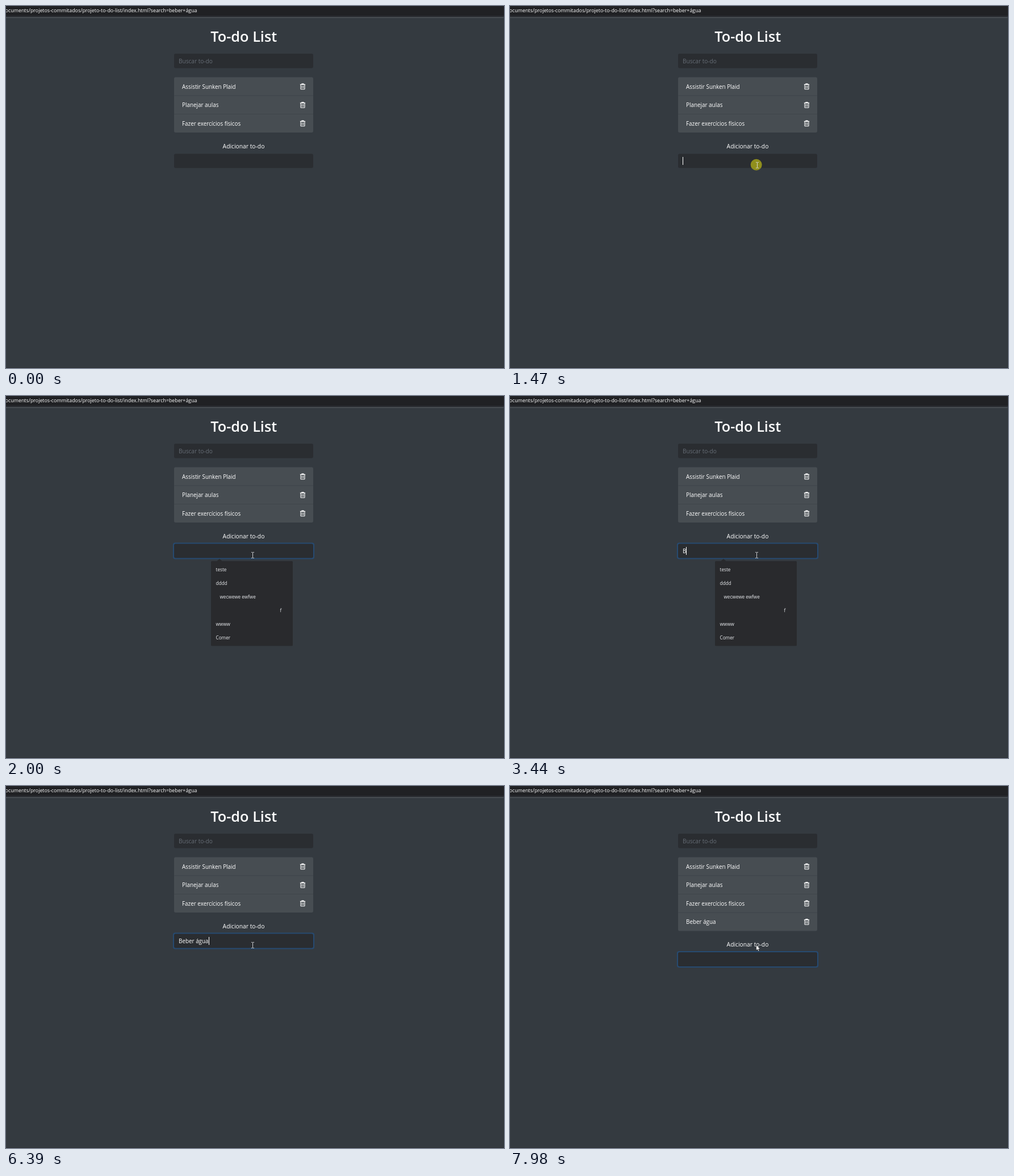
These frames come from a looping animation (877 by 638 pixels, 8000 ms). An HTML page:

```html
<!DOCTYPE html>
<html lang="pt-BR">
<head>
<meta charset="utf-8">
<title>To-do List</title>
<style>
  html, body { margin: 0; width: 100%; height: 100%; overflow: hidden; background: #343a40; }
  svg { display: block; width: 877px; height: 638px; }
  text { font: 9.9px "Open Sans", "Noto Sans", sans-serif; fill: #fff; white-space: pre; }
  .title { font-size: 25.3px; font-weight: 600; }
  .url { font-size: 8.85px; }
  .label { font-size: 10.3px; }
  .hint { font-size: 10.1px; fill: #656c75; }
  .small { font-size: 8.2px; fill: #e8eaed; }
  .field { fill: #2a2d31; }
</style>
</head>
<body>
<svg viewBox="0 0 877 638">
  <defs>
    <g id="trash" fill="none" stroke="#fff">
      <path d="M-4.6 -3.6H4.6M-2.3 -3.8L-1.5 -4.9H1.5L2.3 -3.8" stroke-width="1.1"/>
      <path d="M-3.5 -3.4V4.1Q-3.5 4.8 -2.8 4.8H2.8Q3.5 4.8 3.5 4.1V-3.4" stroke-width="1.1"/>
      <path d="M-1.3 -1.8V3.1M1.3 -1.8V3.1" stroke-width="1"/>
    </g>
  </defs>

  <rect width="877" height="638" fill="#343a40"/>
  <rect width="877" height="17" fill="#202124"/>
  <rect y="17" width="877" height="2" fill="#2a2c30"/>
  <rect y="20" width="876" height="1" fill="#54585c"/>
  <rect x="876" y="21" width="1" height="617" fill="#2f3439"/>
  <rect y="637" width="877" height="1" fill="#2b2f33"/>
  <text class="url" x="336.5" y="11" text-anchor="end">ocuments/projetos-commitados/projeto-to-do-list/index.html?search=beber+água</text>

  <text class="title" x="418.7" y="63" text-anchor="middle">To-do List</text>
  <rect class="field" x="296" y="84" width="245" height="25.5" rx="2.7"/>
  <text class="hint" x="304" y="101.3">Buscar to-do</text>

  <rect id="listBox" x="296" y="125.5" width="245" rx="2.7" fill="#474d52"/>
  <g id="items"></g>

  <g id="form">
    <text class="label" x="418.5" y="250.8" text-anchor="middle">Adicionar to-do</text>
    <rect id="ring" x="293.9" y="258.4" width="249.2" height="29.2" rx="4" fill="#274a70"/>
    <rect class="field" x="296" y="260.5" width="245" height="25" rx="2.7"/>
    <text id="typed" x="304" y="277.3"></text>
    <rect id="caret" y="266" width="1" height="14" fill="#fff"/>
  </g>

  <g id="suggestions">
    <path d="M371 291.5L376 287L381 291.5Z" fill="#292a2d"/>
    <rect x="361" y="291" width="144" height="149.5" rx="1.5" fill="#292a2d"/>
  </g>

  <circle id="press" cx="433.7" cy="279.7" r="10" fill="#908f1d"/>
  <path id="beam" d="M-2.5 -5H-.7L0 -4.4L.7 -5H2.5M0 -4.4V4.4M-2.5 5H-.7L0 4.4L.7 5H2.5" fill="none" stroke="#dcdddf" stroke-width=".9"/>
  <path id="arrow" d="M0 0V9.8L2.2 7.8L3.7 11.2L5.3 10.5L3.9 7.2H6.9Z" fill="#fff" stroke="#15171a" stroke-width=".6"/>
</svg>

<script>
const LOOP = 8000, ROW = 32.5, SUBMIT = 6990;
const $ = id => document.getElementById(id);
const show = (id, on) => $(id).setAttribute('visibility', on ? 'visible' : 'hidden');
const place = (id, x, y) => $(id).setAttribute('transform', `translate(${x} ${y})`);
const clamp = v => Math.max(0, Math.min(1, v));
const between = (t, a, b) => t >= a && t < b;

const tasks = ['Assistir Sunken Plaid', 'Planejar aulas', 'Fazer exercícios físicos', 'Beber água'];
$('items').innerHTML = tasks.map((task, i) => `
  <g id="item${i}" transform="translate(0 ${125.5 + i * ROW})">
    ${i ? '<rect x="296" y="-.5" width="245" height="1" fill="#3f454a"/>' : ''}
    <text x="310" y="20">${task}</text>
    <use href="#trash" x="522.5" y="16.5"/>
  </g>`).join('');

const suggestions = [['teste', 369.5], ['dddd', 369.5], ['wecwewe ewfwe', 376.5],
  ['f', 482.5], ['wwww', 369.5], ['Comer', 369.5]];
$('suggestions').insertAdjacentHTML('beforeend', suggestions.map(([word, x], i) =>
  `<text class="small" x="${x}" y="${309 + i * 24}">${word}</text>`).join(''));

const phrase = tasks[3];
const keyTimes = [3380, 3580, 3720, 3810, 3910, 4110, 5710, 6190, 6290, 6390];
const caretSpans = [[1470, 2000], [2530, 3010], [3380, 4650], [5170, SUBMIT], [7520, 7980]];

// Two eased strokes: in from the lower right, then up into the field.
function pointerAt(t) {
  const glide = (from, to, u) => {
    const k = 1 - (1 - clamp(u)) ** 2;
    return from.map((v, i) => v + (to[i] - v) * k);
  };
  if (t < 1000) return glide([826, 629], [449.7, 295.7], (t - 130) / 800);
  return glide([447, 292], [435.5, 280.5], (t - 1000) / 300);
}

function render(t) {
  const added = t >= SUBMIT;
  const rows = added ? 4 : 3;
  $('listBox').setAttribute('height', rows * ROW);
  show('item3', added);
  place('form', 0, added ? ROW : 0);

  const count = added ? 0 : keyTimes.filter(k => t >= k).length;
  $('typed').textContent = phrase.slice(0, count);
  const width = count ? $('typed').getComputedTextLength() : 0;
  $('caret').setAttribute('x', Math.round(304 + width));
  $('caret').setAttribute('y', added ? 266.5 : 266);
  show('caret', caretSpans.some(([a, b]) => between(t, a, b)));

  $('ring').setAttribute('opacity', clamp((t - 1470) / 140));
  show('suggestions', between(t, 1610, 3450));
  show('press', between(t, 1400, 1610));

  const [x, y] = pointerAt(t);
  const overField = between(t, 1000, 7120) && y < 286;
  show('beam', overField);
  show('arrow', t >= 130 && !overField);
  place('beam', t < 1750 ? x : 434.5, y);
  if (t >= 7120) place('arrow', 433.6, 280);
  else place('arrow', x, y);
}

const start = performance.now();
function tick() {
  render((performance.now() - start) % LOOP);
  requestAnimationFrame(tick);
}
tick();
</script>
</body>
</html>
```
